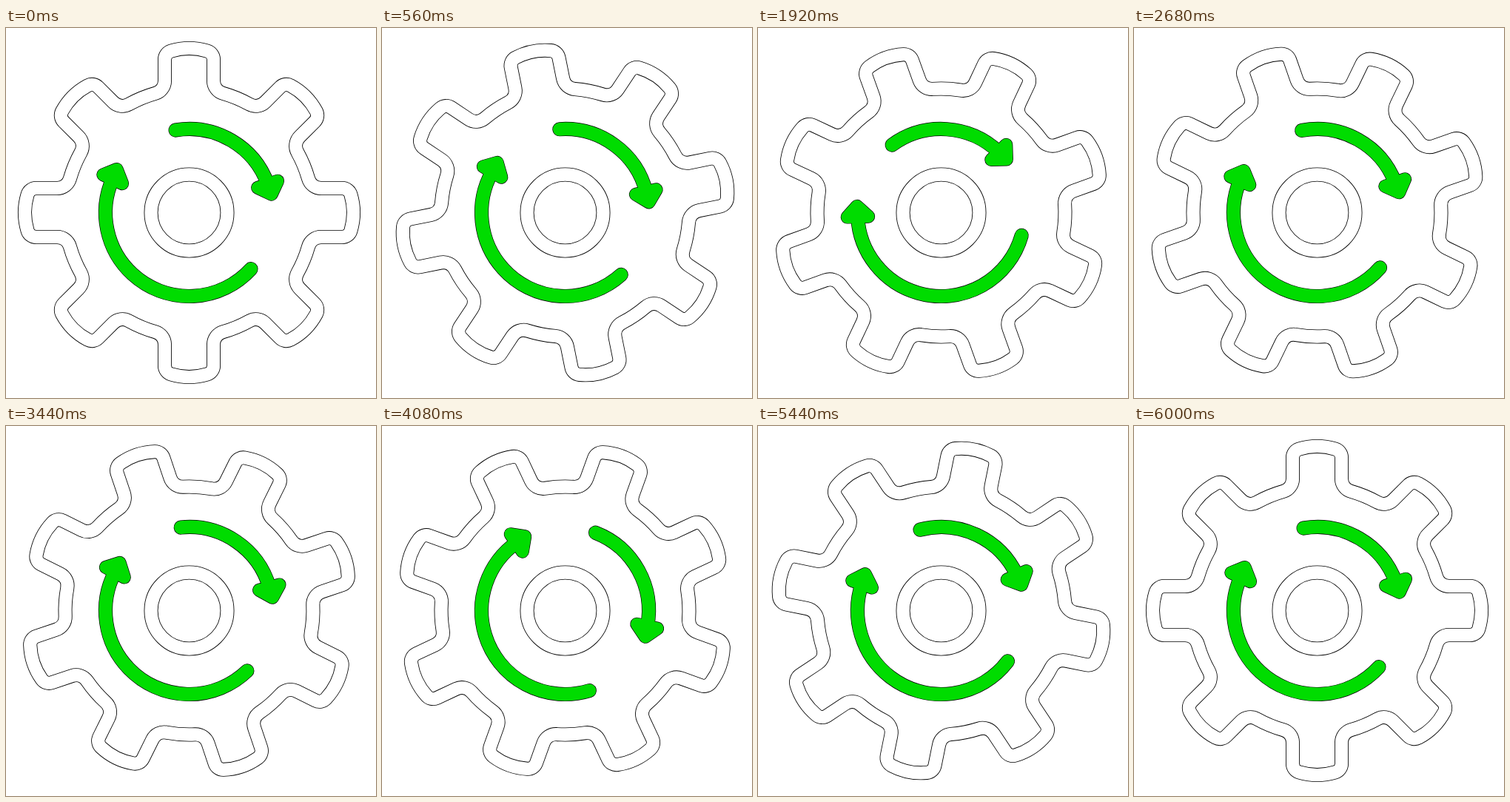
Write an HTML page with a canvas that moves like this. It is 500 by 500 pixels and loops after 6.08 s.

```html
<!DOCTYPE html>
<html lang="en">
<head>
<meta charset="utf-8">
<title>Turning gear</title>
<style>
  html, body { margin: 0; width: 100%; height: 100%; overflow: hidden; background: #fff; }
  canvas { display: block; width: 500px; height: 500px; }
</style>
</head>
<body>
<canvas id="stage" width="500" height="500"></canvas>
<script>
const ctx = document.getElementById('stage').getContext('2d');
const CX = 247.5, CY = 249.5;
const STEP = 40, LAST = 150, LOOP = 6080;
const SPLIT = 74;             // step at which the arrows end their first turn
const RAD = Math.PI / 180;
const GREEN = '#00dc00';

// Very strong ease in and out: cubic curve with handles (1, 0) and (0, 1).
function ease(x) {
  let lo = 0, hi = 1;
  for (let i = 0; i < 40; i++) {
    const s = (lo + hi) / 2;
    if (3 * s * (1 - s) * (1 - s) + s * s * s < x) lo = s; else hi = s;
  }
  const s = (lo + hi) / 2;
  return s * s * (3 - 2 * s);
}

// Centre line of the gear: eight rounded teeth joined by arcs of the body.
function makeGear() {
  const body = 167.5, half = 33, foot = 18, corner = 12, cap = 85, top = 222;
  const footX = half + foot;
  const footY = -Math.sqrt((body + foot) ** 2 - footX ** 2);
  const footTurn = Math.atan2(-footY, footX);
  const capY = cap - top;
  const cornerX = half - corner;
  const rise = Math.sqrt((cap - corner) ** 2 - cornerX ** 2);
  const cornerY = capY - rise;
  const cornerTurn = Math.atan2(rise, cornerX);
  const tooth = new Path2D();
  tooth.arc(-footX, footY, foot, footTurn, 0, true);
  tooth.arc(-cornerX, cornerY, corner, Math.PI, Math.PI + cornerTurn);
  tooth.arc(0, capY, cap, Math.PI + cornerTurn, -cornerTurn);
  tooth.arc(cornerX, cornerY, corner, -cornerTurn, 0);
  tooth.arc(footX, footY, foot, Math.PI, Math.PI - footTurn, true);
  tooth.arc(0, 0, body, -footTurn, footTurn - Math.PI * 3 / 4);
  const gear = new Path2D();
  for (let i = 0; i < 8; i++) {
    gear.addPath(tooth, new DOMMatrix().rotate(i * 45));
  }
  return gear;
}

// Angles run clockwise from straight up.
function polar(r, deg) {
  return [r * Math.sin(deg * RAD), -r * Math.cos(deg * RAD)];
}

function makeArrow(from, to) {
  const shaft = new Path2D();
  shaft.arc(0, 0, 113, (from - 90) * RAD, (to - 90) * RAD);
  const head = new Path2D();
  head.moveTo(...polar(127, to));
  head.lineTo(...polar(114, to + 7.1));
  head.lineTo(...polar(98.5, to - 0.3));
  head.closePath();
  return { shaft, head };
}

const gear = makeGear();
const ring = new Path2D();
ring.arc(0, 0, 51.5, 0, 2 * Math.PI);
const arrows = [makeArrow(-9.4, 70.3), makeArrow(132.4, 293.8)];

function stroke(path, color, width) {
  ctx.strokeStyle = color;
  ctx.lineWidth = width;
  ctx.stroke(path);
}

function hollow(path) {
  stroke(path, '#000', 19);
  stroke(path, '#fff', 17.3);
}

function drawArrows(color, grow) {
  ctx.fillStyle = color;
  for (const { shaft, head } of arrows) {
    stroke(shaft, color, 17.8 + grow);
    ctx.fill(head);
    stroke(head, color, 16.6 + grow);
  }
}

function turned(deg, paint) {
  ctx.save();
  ctx.translate(CX, CY);
  ctx.rotate(deg * RAD);
  paint();
  ctx.restore();
}

function draw(step) {
  ctx.fillStyle = '#fff';
  ctx.fillRect(0, 0, 500, 500);
  ctx.lineJoin = 'round';
  ctx.lineCap = 'round';

  turned(step * 360 / LAST, () => hollow(gear));
  turned(0, () => hollow(ring));

  const part = step < SPLIT ? step / SPLIT : (step - SPLIT) / (LAST - SPLIT);
  turned(360 * ease(part), () => {
    drawArrows('#000', 1.4);
    drawArrows(GREEN, 0);
  });
}

const start = performance.now();
function tick() {
  const t = (performance.now() - start) % LOOP;
  draw(Math.min(LAST, Math.floor(t / STEP)));
  requestAnimationFrame(tick);
}
tick();
</script>
</body>
</html>
```
